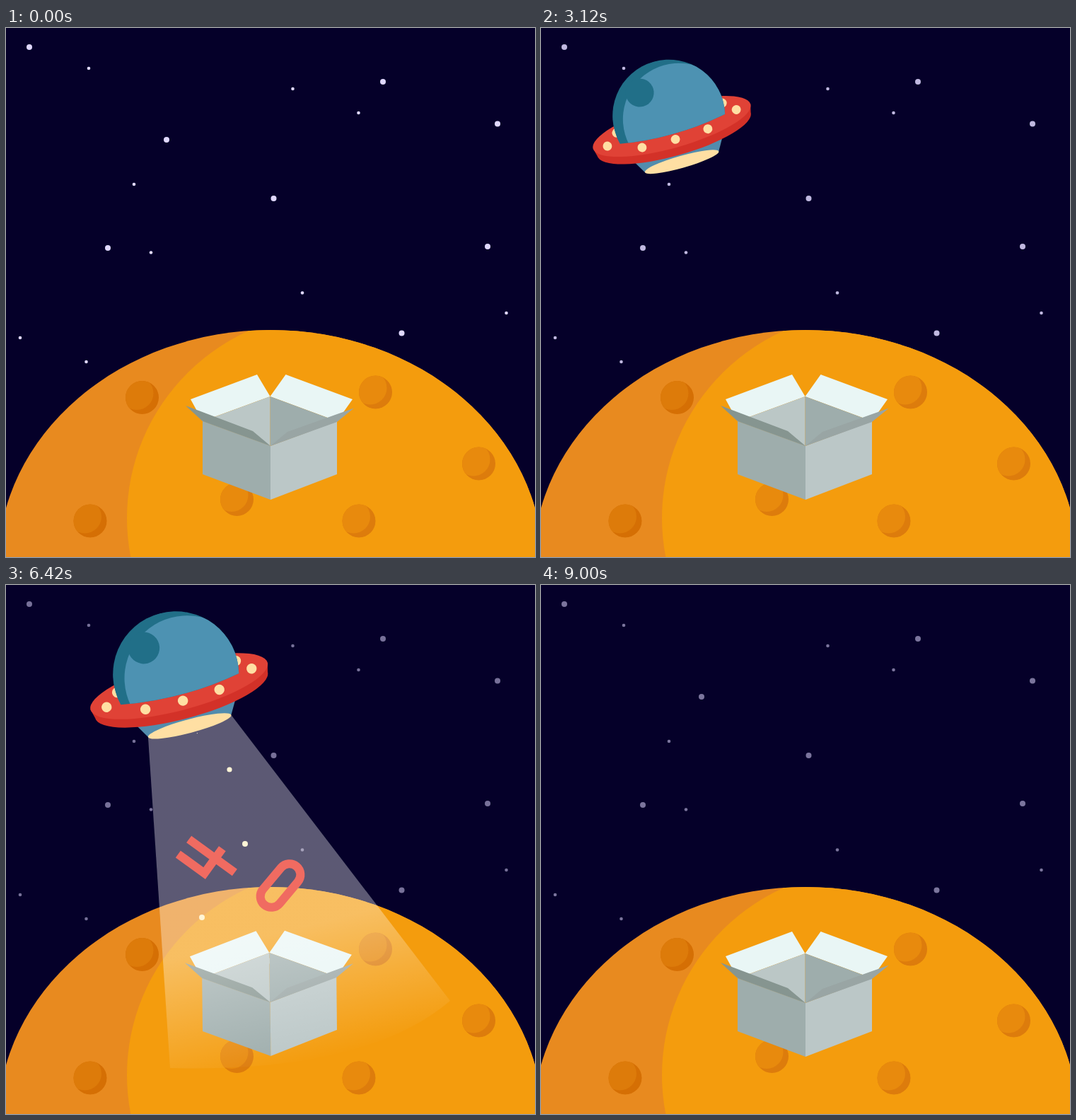
Recreate the animation shown at these times as an HTML page. Size 748 by 748 pixels, loop 9.06 s.

```html
<!DOCTYPE html>
<html lang="en">
<head>
<meta charset="utf-8">
<title>Box on a planet</title>
<style>
  html, body { margin: 0; width: 100%; height: 100%; overflow: hidden; background: #050029; }
  svg { display: block; width: 100vw; height: 100vh; }
</style>
</head>
<body>
<svg viewBox="0 0 748 748">
  <defs>
    <clipPath id="moonClip"><ellipse cx="374" cy="757" rx="385" ry="330"/></clipPath>
    <clipPath id="craterClip"><circle r="23.5"/></clipPath>
    <clipPath id="domeClip"><path d="M-162 42A167 167 0 1 1 162 42Q0 72 -162 42Z"/></clipPath>
    <linearGradient id="beamFill" gradientUnits="userSpaceOnUse" x1="395" y1="490" x2="440" y2="672">
      <stop offset="0" stop-color="#fff" stop-opacity=".35"/>
      <stop offset="1" stop-color="#fff" stop-opacity="0"/>
    </linearGradient>
  </defs>

  <rect width="748" height="748" fill="#050029"/>
  <g id="stars" fill="#e0d8ff"></g>

  <g clip-path="url(#moonClip)">
    <rect y="420" width="748" height="328" fill="#e88a1f"/>
    <ellipse cx="468" cy="693" rx="297" ry="292" fill="#f49c0d"/>
  </g>
  <g id="craters"></g>
  <g id="dust" fill="#fff0c0"></g>

  <g id="boxBack">
    <path fill="#e9f6f5" d="M261 525L355 490L373.5 521L278 556ZM490 525L395.500 490L373.500 521L468 556Z"/>
    <path fill="#bbc7c6" d="M373.500 521L278 556L373.500 591Z"/>
    <path fill="#9eadac" d="M373.500 521L468 556L373.500 591Z"/>
  </g>
  <g id="digits" fill="none" stroke="#e81c0c" stroke-width="12"></g>
  <g id="boxFront">
    <path fill="#9eadac" d="M278 556L374 591V667L278 631Z"/>
    <path fill="#bbc7c7" d="M468 556L374 591V667L468 631Z"/>
    <path fill="#869590" d="M254 534L349 570L374 591L278 556Z"/>
    <path fill="#99a5a4" d="M492 537.500L398 571L374 591L468 557Z"/>
  </g>

  <path id="beam" fill="url(#beamFill)"/>

  <g id="ship">
    <path fill="#528cad" d="M-154 75H154L114 143.500H-114Z"/>
    <ellipse cx="0" cy="143.500" rx="114" ry="18" fill="#ffdfa3"/>
    <path fill="#d33128" d="M-243 34L-237 58A237 64 0 0 0 237 58L243 34Z"/>
    <ellipse cx="0" cy="34" rx="243" ry="64" fill="#e04236"/>
    <g id="lamps" fill="#ffdfa3"></g>
    <g clip-path="url(#domeClip)">
      <circle r="170" fill="#216f88"/>
      <circle cx="26" cy="19" r="166" fill="#4d92b2"/>
      <circle cx="-64.400" cy="-88" r="42" fill="#216f88"/>
    </g>
  </g>
</svg>

<script>
const LOOP = 9060, STEP = 60;
const byId = id => document.getElementById(id);
const clamp = v => Math.max(0, Math.min(1, v));

function add(parent, tag, attrs) {
  const el = document.createElementNS('http://www.w3.org/2000/svg', tag);
  for (const name in attrs) el.setAttribute(name, attrs[name]);
  return parent.appendChild(el);
}
const addDots = (parent, r, points) =>
  points.forEach(([cx, cy]) => add(parent, 'circle', { cx, cy, r }));

// Smooth path through keys of the form [time, ...values]
function follow(keys, t) {
  const last = keys.length - 1;
  if (t <= keys[0][0]) return keys[0].slice(1);
  if (t >= keys[last][0]) return keys[last].slice(1);
  const i = keys.findIndex(k => k[0] > t) - 1;
  const a = keys[i], b = keys[i + 1];
  const before = keys[Math.max(0, i - 1)], after = keys[Math.min(last, i + 2)];
  const span = b[0] - a[0], u = (t - a[0]) / span;
  return a.slice(1).map((from, n) => {
    const j = n + 1;
    const m0 = (b[j] - before[j]) / (b[0] - before[0]) * span;
    const m1 = (after[j] - a[j]) / (after[0] - a[0]) * span;
    const ease = u * u * (3 - 2 * u);
    return from + (b[j] - from) * ease + m0 * u * (1 - u) ** 2 - m1 * u * u * (1 - u);
  });
}

addDots(byId('stars'), 4, [[33, 27], [533, 76], [695, 135.5], [227, 158], [378.5, 241], [144, 311], [681, 309], [559.5, 431.5]]);
addDots(byId('stars'), 2.3, [[117, 57], [405.5, 86], [498.5, 120], [181, 221], [205, 317.5], [419, 374.5], [707.5, 403], [20, 438], [113.5, 472]]);
addDots(byId('lamps'), 13.5, [[-200, 38.5], [-102, 70.5], [0, 74], [101, 70.5], [198, 38.5], [-163, 8], [163, 8]]);

for (const [x, y] of [[192.5, 522.5], [119, 697], [522.5, 515], [668.5, 616], [326.5, 666.5], [499, 697]]) {
  const shaded = x < 200;
  const crater = add(byId('craters'), 'g', { transform: `translate(${x} ${y})`, 'clip-path': 'url(#craterClip)' });
  add(crater, 'circle', { r: 24, fill: shaded ? '#d56f04' : '#dd7c0c' });
  add(crater, 'circle', { cx: -7.5, cy: -6, r: 23.5, fill: shaded ? '#dd7b0a' : '#e88a0d' });
}

// time, x, y, scale, rotation
const shipKeys = [
  [0, 1050, -200, 1.1, -24], [1020, 300, 332, 1, -18.5], [1450, -100, 455, .95, -18],
  [1700, -330, 380, .88, -17], [2000, -150, 290, .75, -16], [2400, 600, 250, .62, -15],
  [2900, 95, 140, .5, -16], [3120, 180.5, 123.5, .476, -15.8],
  ...[3600, 3700, 7950, 8050].map(t => [t, 240, 125.5, .533, -14.9]),
  [8350, 120, 85, .56, -15], [8640, 380, 250, .8, -17], [8800, 800, 420, 1, -19], [8940, 1250, 520, 1.1, -20]
];

// time, x, y, rotation, vertical scale
const FOUR = 'M-26 -40V6H17M0 -40V40';
const ZERO = 'M-15.5 -20a15.500 15.500 0 0 1 31 0v40a15.500 15.500 0 0 1 -31 0Z';
const digits = [
  [FOUR, [[3900, 372, 600, 10, .2], [4800, 357, 497, -3, .43], [6420, 291, 383, -54, 1], [7300, 260, 165, -80, 1]]],
  [ZERO, [[4500, 415, 610, 58, 1], [4800, 412, 593, 55, 1], [6420, 388, 425, 40, 1], [7440, 297, 182, 15, 1], [7600, 275, 150, 10, 1]]],
  [FOUR, [[6500, 372, 620, 20, 1], [7440, 340.5, 491.5, -23, 1], [7950, 265, 165, -60, 1]]]
].map(([d, keys]) => ({ keys, el: add(byId('digits'), 'path', { d }) }));

// Each speck passes the point (x, y) at the given time
const dust = [
  [4800, 435, 439], [4800, 300, 647], [5500, 360, 420], [5600, 300, 330], [6420, 316, 261],
  [6420, 338, 366], [6420, 277, 470], [7440, 286, 256], [7440, 397, 465]
].map(at => ({ at, el: add(byId('dust'), 'circle', {}) }));

function set(el, attrs) {
  for (const name in attrs) el.setAttribute(name, attrs[name]);
}

function draw(t) {
  const power = clamp((t - 3600) / 240) * clamp((8130 - t) / 180);
  const sway = (1 - Math.cos((t - 6420) / 2280 * 2 * Math.PI)) / 2;

  set(byId('stars'), { opacity: .75 + .25 * Math.cos(t / 2640 * 2 * Math.PI) });

  let [x, y, scale, angle] = follow(shipKeys, t);
  x += 2.5 * sway * power;
  y += 6 * sway * power;
  angle -= .3 * sway * power;
  set(byId('ship'), { transform: `translate(${x} ${y}) rotate(${angle}) scale(${scale})` });

  const rad = angle * Math.PI / 180, cos = Math.cos(rad) * scale, sin = Math.sin(rad) * scale;
  const mouth = side => `${x + side * 114 * cos - 143.5 * sin} ${y + side * 114 * sin + 143.5 * cos}`;
  const left = 232 + 19 * sway, right = 628 - 19.5 * sway, rightY = 588 + 8 * sway;
  set(byId('beam'), {
    d: `M${mouth(-1)}L${mouth(1)}L${right} ${rightY}Q${right - 120} 690 ${left} 683Z`,
    opacity: power
  });

  const tilt = -(.6 + 3.2 * sway ** 2.5) * power;
  for (const id of ['boxBack', 'boxFront']) set(byId(id), { transform: `rotate(${tilt} 279 631)` });

  for (const { el, keys } of digits) {
    const [dx, dy, turn, stretch] = follow(keys, t);
    const shown = t >= keys[0][0] && t < keys[keys.length - 1][0];
    set(el, {
      transform: `translate(${dx} ${dy}) rotate(${turn}) scale(1 ${stretch})`,
      visibility: shown ? 'visible' : 'hidden'
    });
  }

  for (const { el, at: [time, px, py] } of dust) {
    const cy = py - .27 * (t - time);
    const cx = 270 + (px - 270) * (cy - 205) / (py - 205);
    const r = Math.max(0, Math.min(4, (cy - 200) / 17, (665 - cy) / 15));
    set(el, { cx, cy, r: r * (power > 0 ? 1 : 0) });
  }
}

function tick() {
  draw(Math.floor(performance.now() % LOOP / STEP) * STEP);
  requestAnimationFrame(tick);
}
tick();
</script>
</body>
</html>
```
